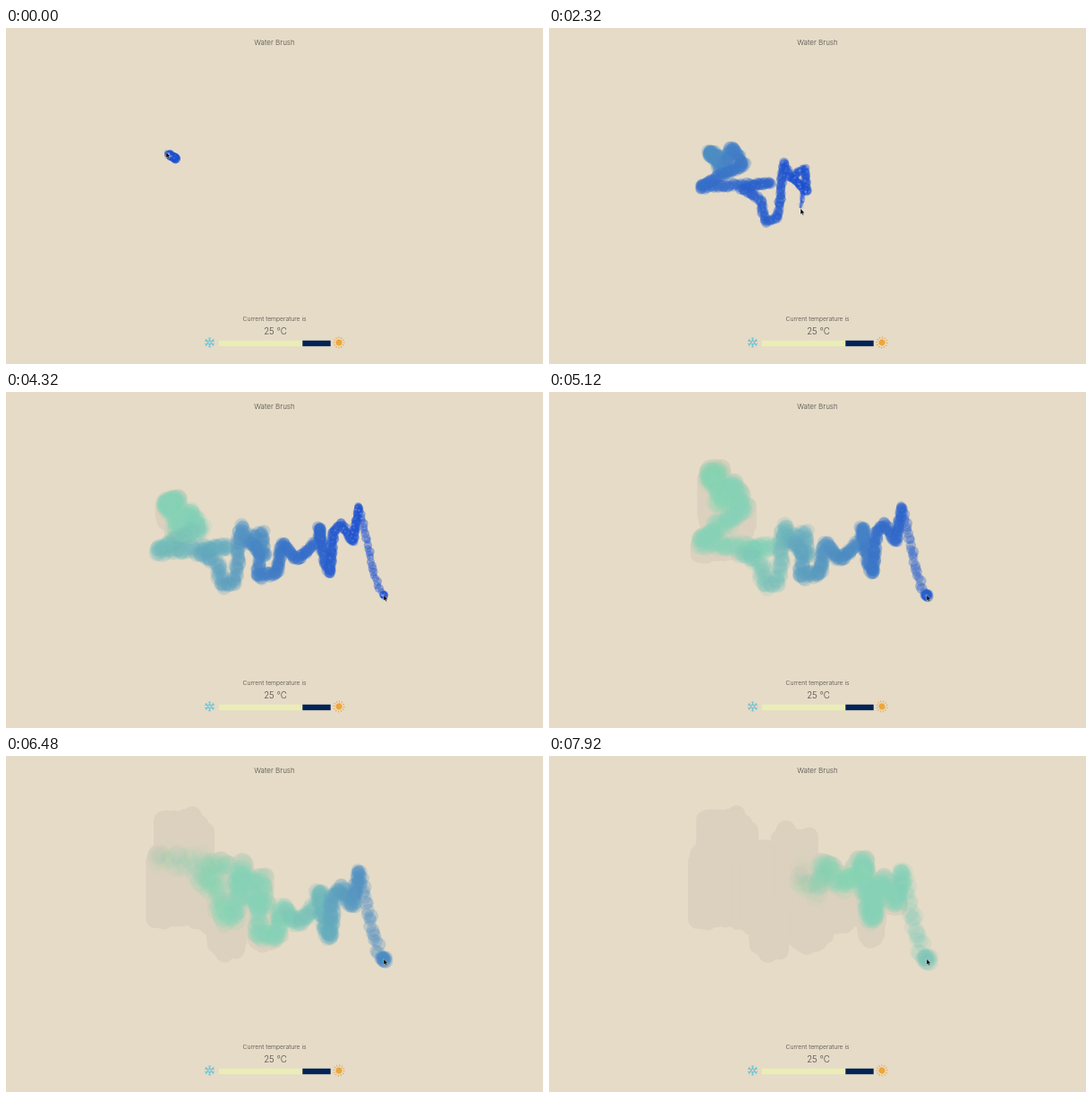
Recreate the animation shown at these times as an HTML page with a canvas. Size 600 by 375 pixels, loop 8 s.

```html
<!DOCTYPE html>
<html>
<head>
<meta charset="utf-8">
<style>
html, body { margin: 0; width: 100%; height: 100%; overflow: hidden; background: #e5dbc7; }
canvas, svg { position: absolute; left: 0; top: 0; width: 600px; height: 375px; }
text { font-family: Inter, "Open Sans", sans-serif; font-weight: 300; fill: #4f4a46; text-anchor: middle; }
</style>
</head>
<body>
<canvas id="stage" width="600" height="375"></canvas>
<svg viewBox="0 0 600 375">
  <text x="300" y="19" font-size="8">Water Brush</text>
  <text x="300" y="326.5" font-size="6.8">Current temperature is</text>
  <text x="301" y="341.5" font-size="9.7">25 °C</text>
  <rect x="238" y="348.8" width="93.3" height="6.4" fill="#ebedb7"/>
  <rect x="331.3" y="348.8" width="31.4" height="6.4" fill="#022357"/>
  <g id="snow" transform="translate(227.5 351)" fill="none" stroke="#62c1d6" stroke-width=".8"></g>
  <g id="sun" stroke="#eda63a" stroke-linecap="round"><circle r="3.5" fill="#eda63a" stroke="none"/></g>
  <path id="cursor" d="M0 0V6.6L1.5 5.3L2.5 7.4L3.6 6.9L2.7 4.9H4.7Z" stroke="#fff" stroke-width=".4"/>
</svg>
<script>
const LOOP = 8000, STEP = 80, EMIT = 6, START = -300, END = 4300;
const $ = id => document.getElementById(id);
const ctx = $('stage').getContext('2d');
const mix = (a, b, k) => a + (b - a) * k;
const clamp = (v, lo = 0, hi = 1) => Math.min(hi, Math.max(lo, v));

// The hand's route: each stroke goes on from the last and ends at the given time
const strokes = [
  [0, '179,139'],
  [880, '190,152 193,159 204,133 218,153 193,164 168,178'],
  [2320, '248,173 215,179 236,192 242,217 256,210 262,150 270,168 286,156 288,183 273,168 285,180 281,202'],
  [3280, '282,206 303,202 309,169 325,188 350,165 350,150 355,187'],
  [4060, '362,203 366,155 374,147 388,167 394,127'],
  [4220, '404,168 411,206 422,227']
];
const route = [{ x: 190, y: 146, t: START }];
for (const [end, list] of strokes) {
  let last = route.at(-1), len = 0;
  const begin = last.t;
  const pts = list.split(' ').map(s => {
    const [x, y] = s.split(',').map(Number);
    len += Math.hypot(x - last.x, y - last.y);
    return last = { x, y, len };
  });
  for (const p of pts) route.push({ x: p.x, y: p.y, t: mix(begin, end, p.len / len) });
}

function handAt(t) {
  const i = route.findIndex(p => p.t > t);
  if (i < 0) return route.at(-1);
  const a = route[i - 1], b = route[i], k = (t - a.t) / (b.t - a.t);
  return { x: mix(a.x, b.x, k), y: mix(a.y, b.y, k) };
}

let seed = 7;
const rnd = () => (seed = seed * 16807 % 2147483647) / 2147483647 * 2 - 1;
const drops = [];
for (let t = START; t <= END; t += EMIT) {
  const { x, y } = handAt(t);
  drops.push({ t, x, y, dx: rnd(), dy: rnd(), size: rnd(), speed: rnd(), sx: rnd(), sy: rnd() });
}

// Deep blue water warms to mint
function tone(age) {
  const k = clamp(age / 4000) ** 1.4;
  return `${mix(28, 137, k)},${mix(78, 214, k)},${mix(207, 181, k)}`;
}

function dot(x, y, r, fill) {
  ctx.fillStyle = fill;
  ctx.beginPath();
  ctx.arc(x, y, r, 0, 7);
  ctx.fill();
}

function place(d, t) {
  const age = t - d.t, spread = 0.9 + age / 1300;
  return {
    age,
    x: d.x + d.dx * spread,
    y: d.y + d.dy * spread,
    rise: clamp((age - 4000) * (0.039 + 0.005 * d.speed), 0, 64),
    r: (4.3 + Math.min(age, 4800) * 0.0013 + d.size * 0.7) * clamp(0.3 + age / 150)
  };
}

function draw(t) {
  ctx.clearRect(0, 0, 600, 375);
  const live = drops.filter(d => d.t <= t).map(d => ({ ...d, ...place(d, t) }));

  // Damp mark left where colour has risen
  ctx.strokeStyle = '#dbd1be';
  ctx.lineCap = 'round';
  for (const p of live.filter(p => p.rise > 0)) {
    ctx.lineWidth = p.r * 2;
    ctx.beginPath();
    ctx.moveTo(p.x, p.y);
    ctx.lineTo(p.x, p.y - p.rise);
    ctx.stroke();
  }

  for (const p of live) {
    const fade = clamp((5700 - p.age) / 800);
    if (!fade) continue;
    const alpha = mix(0.42, 0.17, clamp(p.age / 3600)) * fade;
    dot(p.x, p.y - p.rise, p.r, `rgba(${tone(p.age)},${alpha})`);
    const shine = 0.4 * (1 - p.age / 1600);
    if (shine > 0) dot(p.x + p.sx * 3, p.y + p.sy * 3, 1.3, `rgba(165,188,240,${shine})`);
  }

  const { x, y } = handAt(t);
  $('cursor').setAttribute('transform', `translate(${x} ${y - 0.5})`);
  $('sun').setAttribute('transform', `translate(372 351) rotate(${t * 0.015})`);
}

const spokes = (n, d) => Array.from({ length: n }, (_, i) =>
  `<path d="${d}" transform="rotate(${i * 360 / n})"/>`).join('');
$('snow').innerHTML = spokes(6, 'M0 -1V-5.6M-1.6 -5.2L0 -3.8L1.6 -5.2M-1.3 -2.2H1.3');
$('sun').innerHTML += spokes(12, 'M0 -5.2V-6.2');

const begin = performance.now();
function frame() {
  const t = (performance.now() - begin) % LOOP;
  draw(Math.floor(t / STEP) * STEP);
  requestAnimationFrame(frame);
}
frame();
</script>
</body>
</html>
```
